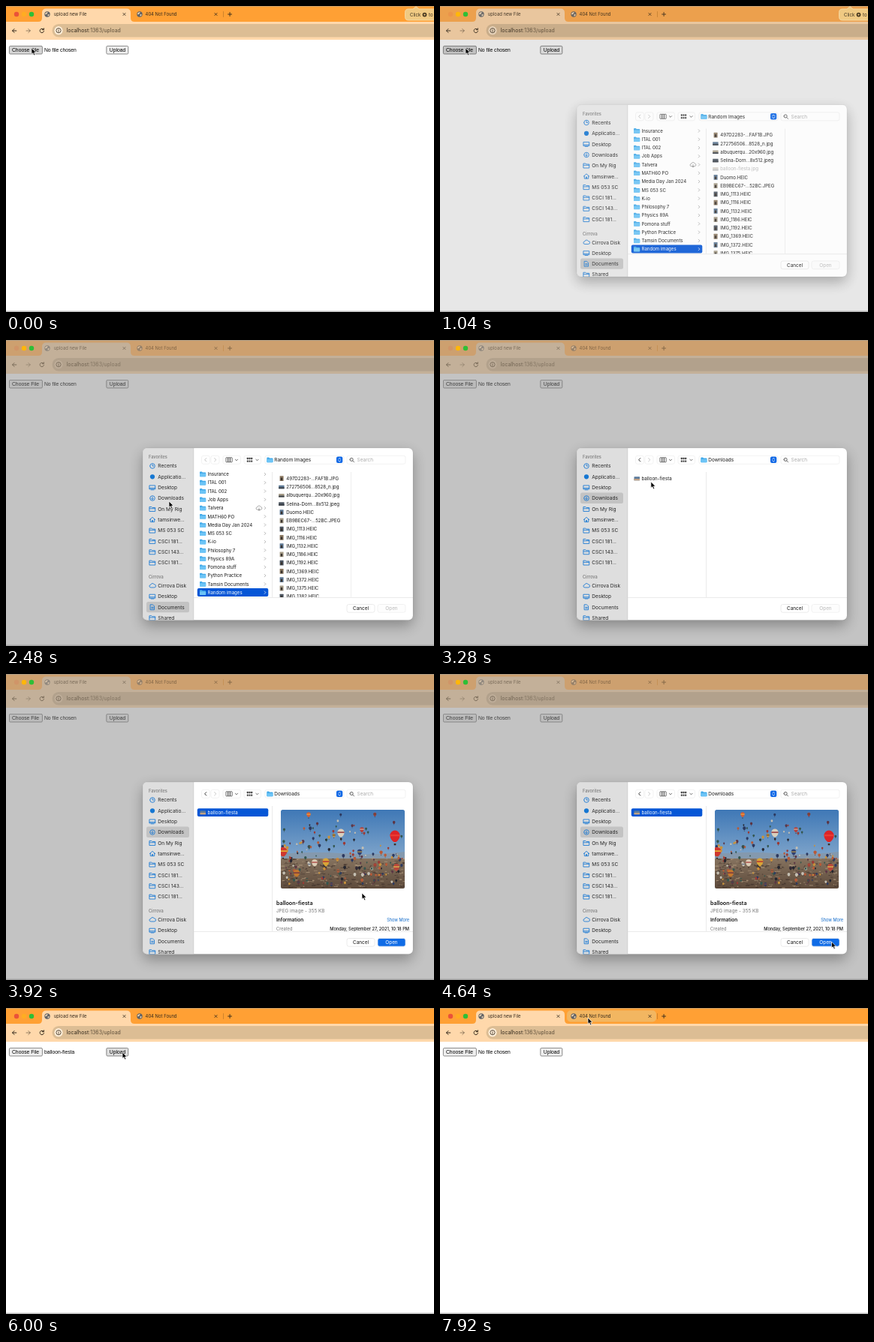
These frames come from a looping animation (570x408 px, 8000 ms). An HTML page:

```html
<!DOCTYPE html>
<html lang="en">
<head>
<meta charset="utf-8">
<title>Upload demo</title>
<style>
html,body{margin:0;width:100%;height:100%;overflow:hidden;background:#fff}
svg{display:block;width:570px;height:408px}
text{font-family:Inter,sans-serif;white-space:pre}
#page text{font-family:"Liberation Sans",Arial,sans-serif;font-size:6.75px}
</style>
</head>
<body>
<svg id="stage" viewBox="0 0 570 408" xmlns="http://www.w3.org/2000/svg"></svg>
<script>
const LOOP = 8000, STEP = 80;

// ---- markup helpers
const text = (x, y, s, size, fill = '#161616', extra = '') =>
  `<text x="${x}" y="${y}" font-size="${size}" fill="${fill}" ${extra}>${s}</text>`;
const rect = (x, y, w, h, r, fill, extra = '') =>
  `<rect x="${x}" y="${y}" width="${w}" height="${h}" rx="${r}" fill="${fill}" ${extra}/>`;
const line = (d, stroke, w = .8, extra = '') =>
  `<path d="${d}" fill="none" stroke="${stroke}" stroke-width="${w}" stroke-linecap="round" stroke-linejoin="round" ${extra}/>`;
const dot = (x, y, r, fill, extra = '') => `<circle cx="${x}" cy="${y}" r="${r}" fill="${fill}" ${extra}/>`;
const group = (id, body, extra = '') => `<g id="${id}" ${extra}>${body}</g>`;
const cross = (x, y) => line(`M${x - 1.6} ${y - 1.6}l3.2 3.2m0-3.2l-3.2 3.2`, '#33291c');
const chevron = (x, y, c = '#999') => line(`M${x - .8} ${y - 1.7}l1.7 1.7l-1.7 1.7`, c, .7);
const drop = (x, y) => line(`M${x - 1.6} ${y - .8}l1.6 1.6l1.6-1.6`, '#444', .8);

function globe(x, y) {
  return dot(x, y, 3.7, '#5f6165') +
    `<path d="M${x - 2.8} ${y - 1.2}q1.6-2 3.4-1.4q.2 1.5-1.4 1.7q-.2 1.6-1.7 1.2z M${x + .2} ${y + .3}q2-.4 2.7.3q-.6 2-2.3 2.2q.5-1.3-.4-2.5z" fill="#f3dcbc"/>`;
}

// ---- browser chrome
function chrome() {
  const ink = '#33291c';
  const lights = dot(14, 11, 3.2, '#e8493a', 'id="red"') + dot(24, 11, 3.2, '#ffab1c', 'id="yellow"') +
    dot(34, 11, 3.2, '#2fbf36');
  const tabs = globe(55, 11) + text(63.8, 13.1, 'upload new File', 5.9, ink) + cross(157.5, 11) +
    globe(178, 11) + text(185.6, 13.1, '404 Not Found', 5.9, ink) + cross(279.5, 11) +
    line('M289.5 7.5v7', '#b9772a', .7) + line('M295.6 11h5m-2.5-2.5v5', ink, .9);
  const bar = line('M13.8 33h-5.2m2.4-2.5l-2.5 2.5l2.5 2.5', ink, 1) +
    line('M27 33h5.2m-2.4-2.5l2.5 2.5l-2.5 2.5', ink, 1, 'opacity=".5"') +
    line('M50 31.3a2.7 2.7 0 1 0 .5 2.2M50.4 29.8v1.9h-2', ink, 1) +
    dot(70, 32.7, 5.6, '#fff0dc', 'id="badge"') +
    `<circle cx="70" cy="32.7" r="3.1" fill="none" stroke="${ink}" stroke-width=".8"/>` +
    line('M70 32.5v1.8M70 31v.1', ink, .8) +
    text(80.6, 35.2, 'localhost<tspan fill-opacity=".75">:1363/upload</tspan>', 6.95, ink);
  return rect(0, 0, 570, 22, 0, '#ffa034', 'id="strip"') +
    rect(169, 3.3, 119, 15.2, 5, '#f2b661', 'id="hover"') +
    `<path id="tool" d="M0 45V21H43q5 0 5-5V9q0-5.5 5.5-5.5h107q5.5 0 5.5 5.5v7q0 5 5 5H570V45z"/>` +
    rect(61.5, 24, 530, 17.5, 8.7, '#dcbd94', 'id="pill"') + lights + group('ink', tabs + bar) +
    rect(0, 0, 570, .8, 0, '#8f9aa0', 'opacity=".6"');
}

function notice() {
  return group('notice',
    `<path d="M536 4h6l4-3.2l4 3.2h30v15h-44q-4.5 0-4.5-4.5v-6q0-4.5 4.5-4.5z" fill="#f0ca83" stroke="#f8dfae" stroke-width=".8"/>` +
    text(538, 13.8, 'Click', 6.1, '#3d3220') + dot(557.5, 11.6, 2.9, '#4b3b22') + dot(557.5, 11.6, 1.1, '#f0ca83') +
    text(563, 13.8, 'to', 6.1, '#3d3220'));
}

function page() {
  const button = (id, x, w, label, tx) =>
    rect(x, 53.4, w, 10.6, 1.4, '#efefef', `id="${id}" stroke="#6f6f6f" stroke-width=".8"`) +
    `<text x="${tx}" y="61">${label}</text>`;
  return group('page', button('choose', 4.4, 44, 'Choose File', 8) +
    '<text id="picked" x="51" y="61"></text>' + button('upload', 133.8, 29, 'Upload', 137.8));
}

// ---- file dialog
const BLUE = '#1677d2', PICK = '#0556d6';
const folder = (x, y) =>
  `<path d="M${x} ${y - 2.6}q0-.8.8-.8h2l1 1h3.6q.8 0 .8.8v4q0 .8-.8.8h-6.6q-.8 0-.8-.8z" fill="#45abea"/>` +
  rect(x, y - 1.1, 8.2, 4.4, .7, '#6cc4f6');
const outline = (x, y, d) => line(`M${x} ${y}${d}`, BLUE, .85);
const icons = {
  clock: (x, y) => outline(x - 3.3, y, 'a3.3 3.3 0 1 0 6.6 0a3.3 3.3 0 1 0-6.6 0m3.3-2v2h1.7'),
  disc: (x, y) => dot(x, y, 3.1, BLUE),
  screen: (x, y) => outline(x - 3.7, y - 2.7, 'h7.4v5h-7.4zm0 3.5h7.4m-5.5 2.3h3.6'),
  down: (x, y) => outline(x - 3.3, y, 'a3.3 3.3 0 1 0 6.6 0a3.3 3.3 0 1 0-6.6 0m3.3-1.7v3.3m-1.3-1.2l1.3 1.3l1.3-1.3'),
  home: (x, y) => outline(x - 3.7, y, 'l3.7-3.3l3.7 3.3m-6.4-.6v3.6h5.4v-3.6') + rect(x - .8, y + .4, 1.6, 2.6, 0, BLUE),
  cloud: (x, y) => outline(x - 2.3, y + 2.4, 'a1.7 1.7 0 0 1 0-3.5a2.5 2.5 0 0 1 4.7-.5a2 2 0 0 1 .3 4z'),
  doc: (x, y) => outline(x - 2.5, y - 3.4, 'h3l2 2v4.9h-5zm1.3 3.4h2.4m-2.4 1.5h2.4'),
  folder: (x, y) => outline(x - 3.7, y - 2.8, 'h2.6l1 1h3.8v5h-7.4zm0 2.3h7.4')
};

function sidebar() {
  const fav = [['clock', 'Recents'], ['disc', 'Applicatio...'], ['screen', 'Desktop'], ['down', 'Downloads'],
    ['folder', 'On My Rig'], ['home', 'tamsinwe...'], ['folder', 'MS 053 SC'], ['folder', 'CSCI 181...'],
    ['folder', 'CSCI 143...'], ['folder', 'CSCI 181...']];
  const cloud = [['cloud', 'Cirrova Disk'], ['screen', 'Desktop'], ['doc', 'Documents'], ['folder', 'Shared']];
  const rows = (list, top) => list.map(([icon, name], i) => {
    const y = top + i * 14.32;
    return icons[icon](195, y) + text(202.3, y + 2.4, name, 6.6, '#262626');
  }).join('');
  const head = (y, s) => text(190, y, s, 5.6, '#858585', 'font-weight="600"');
  return rect(182, 144, 68, 230, 0, '#dedede', 'id="side"') + rect(187, 0, 57, 14.3, 2.5, '#c3c3c3', 'id="place"') +
    head(158.2, 'Favorites') + rows(fav, 168) + head(318.2, 'Cirrova') + rows(cloud, 327.6) +
    rect(249.6, 144, .6, 230, 0, '#c9c9c9');
}

function header() {
  const box = (x, w) => rect(x, 154.3, w, 11, 2.5, '#fff', 'stroke="#ececec" stroke-width=".7"');
  let cols = '', tiles = '';
  for (let i = 0; i < 3; i++) cols += rect(293 + i * 2.7, 156.8, 2.7, 6, .4, 'none', 'stroke="#444" stroke-width=".8"');
  for (let i = 0; i < 6; i++) tiles += rect(320.8 + i % 3 * 2.7, 156.8 + (i > 2 ? 3.6 : 0), 2, 2.4, .4, '#444');
  return box(260.5, 11) + box(273, 11) + box(289, 23.5) + box(317, 22.5) + box(345, 105) + box(454, 78) +
    line('M266.8 157.6l-2.2 2.2l2.2 2.2', '#222', .9, 'id="back"') +
    line('M277.6 157.6l2.2 2.2l-2.2 2.2', '#bbb', .8) +
    cols + drop(307, 160) + tiles + drop(334.5, 160) + folder(347.3, 160) +
    text(357.3, 162.3, '', 6.45, '#161616', 'id="where"') +
    rect(440, 155.6, 8.3, 8.5, 2, '#1a6fe8', 'id="stepper"') +
    line('M442.7 159l1.5-1.5l1.5 1.5m-3 1.7l1.5 1.5l1.5-1.5', '#fff', .8, 'id="arrows"') +
    line('M458 159.4a2.1 2.1 0 1 0 4.2 0a2.1 2.1 0 1 0-4.2 0m3.7 1.6l1.9 1.9', '#444', .8) +
    text(467.5, 162.3, 'Search', 6.5, '#aaa');
}

const FOLDERS = ['Insurance', 'ITAL 001', 'ITAL 002', 'Job Apps', 'Talvera', 'MATH60 PO', 'Media Day Jan 2024', 'MS 053 SC',
  'K-io', 'Philosophy 7', 'Physics 89A', 'Pomona stuff', 'Python Practice', 'Tamsin Documents', 'Random images'];
const FILES = ['497D2283-...FAF1B.JPG', '272756506...8528_n.jpg', 'albuquerqu...20x960.jpg', 'Selina-Dorn...8x512.jpeg',
  'balloon-fiesta.jpg', 'Duomo.HEIC', 'EB9BEC67-...52BC.JPEG', ...[1113, 1116, 1132, 1186, 1192, 1369, 1372, 1375, 1382].map(n => `IMG_${n}.HEIC`)];
const ROW = 11.26;

function thumb(y, i) {
  const wide = i > 0 && i < 5, c = ['#8d7a62', '#5d7894', '#a49a86', '#4c5560'][i % 4];
  return wide ? rect(363.2, y - 2.2, 7.4, 4.6, .3, c) + rect(363.2, y + .4, 7.4, 2, 0, '#3b4148')
    : rect(364.6, y - 3.4, 5, 6.8, .3, c) + rect(365.8, y - 1, 2.4, 3.6, 0, '#39332e');
}

function browse() {
  const left = FOLDERS.map((name, i) => {
    const y = 179 + i * ROW, on = i === 14;
    return (on ? rect(254.8, y - 5.6, 94.5, 10.9, 2, PICK) : '') + folder(258, y) +
      text(268.5, y + 2.2, name, 6.1, on ? '#fff' : '#161616') + chevron(345, y, on ? '#fff' : '#999') +
      (i === 4 ? `<g opacity=".6" transform="translate(337 ${y})">${line('M-2.3 2.2a1.6 1.6 0 0 1 0-3.3a2.4 2.4 0 0 1 4.6-.4a1.9 1.9 0 0 1 .2 3.7zM0-.2v3.4m-1-1l1 1l1-1', '#444', .7)}</g>` : '');
  }).join('');
  const right = FILES.map((name, i) => {
    const y = 184.6 + i * ROW;
    const body = thumb(y, i) + text(373.3, y + 2.2, name, 6.12);
    return i === 4 ? group('extra', body, 'opacity=".3"') : i > 4 ? `<g class="tail">${body}</g>` : body;
  }).join('');
  return group('browse', left + right + rect(459.3, 176, .6, 167, 0, '#e2e2e2'));
}

function balloon(x, y, r, c, band) {
  return `<path d="M${x - r} ${y}a${r} ${r} 0 0 1 ${2 * r} 0q0 ${r * .8}-${r * .75} ${r * 1.4}h-${r * .5}q-${r * .75}-${r * .6}-${r * .75}-${r * 1.4}z" fill="${c}"/>` +
    (r > 2 ? rect(x - r, y - r * .15, 2 * r, r * .35, 0, band) : '') +
    rect(x - r * .2, y + r * 1.7, r * .4, r * .35, 0, '#3d2c22');
}

function photo() {
  let seed = 41;
  const rnd = () => (seed = seed * 16807 % 2147483647) / 2147483647;
  const hues = ['#9c3a35', '#c9923b', '#2c3960', '#c4bfb2', '#5b3545', '#b85a38', '#33564e', '#25262f'];
  const pick = () => hues[Math.floor(rnd() * hues.length)];
  let s = rect(366, 181, 165, 105, 0, 'url(#sky)') +
    `<path d="M366 240q40-4 80-1t85-2v14H366z" fill="#8499ae"/>` + rect(366, 246, 165, 40, 0, 'url(#land)');
  for (let i = 0; i < 260; i++)
    s += rect(366 + rnd() * 163, 245 + rnd() * 40, 1 + rnd() * 5, .5 + rnd(), 0, rnd() < .6 ? '#43362e' : '#b8a083', 'opacity=".7"');
  for (let i = 0; i < 170; i++) {
    const y = 184 + Math.pow(rnd(), .55) * 96, r = .8 + rnd() * 1.3;
    s += balloon(368 + rnd() * 161, y, r, pick(), pick());
  }
  [[518, 215, 6.5, '#dc2428', '#ec3c34'], [446, 211, 4.6, '#d9cfbd', '#9b4043'], [426, 250, 4.4, '#d9a437', '#b63a34'],
    [369, 236, 5.2, '#cf382f', '#e5ac37'], [520, 257, 4, '#b9483a', '#dab551'], [411, 251, 3.8, '#dccdb6', '#a94440'],
    [387, 265, 4, '#c4782f', '#743541'], [471, 237, 3.2, '#303f70', '#c2a04c'], [403, 187, 2.7, '#d65d32', '#e5bd4c'],
    [474, 207, 2.8, '#b4403b', '#d4cfc2']].forEach(b => s += balloon(...b));
  return `<g clip-path="url(#pic)">${s}</g>`;
}

function preview() {
  return group('preview', photo() +
    text(360, 307.6, 'balloon-fiesta', 7.2, '#161616', 'font-weight="600"') +
    text(360, 318, 'JPEG image - 355 KB', 6.35, '#777') +
    text(360, 330.2, 'Information', 6.5, '#161616', 'font-weight="600"') +
    text(537, 330.2, 'Show More', 5.55, '#0a66c8', 'text-anchor="end"') +
    text(360, 341.6, 'Created', 5.7, '#777') +
    text(537, 341.6, 'Monday, September 27, 2021, 10:18 PM', 5.7, '#161616', 'text-anchor="end" font-weight="500"'));
}

function downloads() {
  return group('downloads', rect(254.8, 179.2, 94.5, 10.9, 2, PICK, 'id="row"') +
    rect(258.5, 182.3, 7.5, 5, .4, '#5c7b9c') + rect(258.5, 185, 7.5, 2.3, 0, '#c1a184') +
    text(268.5, 187.1, 'balloon-fiesta', 6.15, '#161616', 'id="rowName"') + preview());
}

function dialog() {
  const body = rect(182, 144, 360, 230, 0, '#fff') + sidebar() + header() +
    `<g clip-path="url(#list)">${browse()}${downloads()}${rect(354.4, 176, .6, 167, 0, '#dedede')}</g>` +
    rect(250, 343, 292, .6, 0, '#dedede') +
    rect(454, 352.5, 37, 10.7, 2.6, '#fff', 'stroke="#e2e2e2" stroke-width=".7"') +
    text(472.5, 360, 'Cancel', 6.4, '#161616', 'text-anchor="middle"') +
    rect(495, 352.5, 37, 10.7, 2.6, '#fdfdfd', 'id="open" stroke="#ececec" stroke-width=".7"') +
    text(513.5, 360, 'Open', 6.4, '#bbb', 'id="openName" text-anchor="middle"');
  return group('sheet', rect(182, 151, 360, 230, 8, '#000', 'opacity=".3" filter="url(#blur)"') +
    `<g clip-path="url(#frame)">${body}</g>` +
    rect(182, 144, 360, 229.5, 6, 'none', 'stroke="#000" stroke-opacity=".12" stroke-width=".6"'));
}

const clip = (id, x, y, w, h, r) => `<clipPath id="${id}">${rect(x, y, w, h, r, '#000')}</clipPath>`;
const fade = (id, a, b) => `<linearGradient id="${id}" x2="0" y2="1"><stop stop-color="${a}"/><stop offset="1" stop-color="${b}"/></linearGradient>`;
const stage = document.getElementById('stage');
stage.innerHTML = `<defs>${clip('frame', 182, 144, 360, 229.5, 6)}${clip('list', 250, 172, 292, 171, 0)}${clip('pic', 366, 181, 165, 105, 2.5)}` +
  fade('sky', '#3f78b6', '#a9c2d8') + fade('land', '#86735f', '#5d4a3b') +
  `<filter id="blur" x="-15%" y="-15%" width="130%" height="135%"><feGaussianBlur stdDeviation="9"/></filter></defs>` +
  rect(0, 0, 570, 408, 0, '#fff') + page() + rect(0, 45, 570, 363, 0, '#000', 'id="shade"') + chrome() + notice() +
  rect(0, 406.7, 570, .9, 0, '#8d8d8d') + dialog() +
  `<path id="cursor" d="M0 0v8.3l1.9-1.7l1.4 3.1l1.5-.7l-1.4-2.9h2.6z" fill="#000" stroke="#fff" stroke-width=".7"/>`;

// ---- timeline
const el = {};
stage.querySelectorAll('[id]').forEach(n => el[n.id] = n);
const tails = stage.querySelectorAll('.tail');
const set = (id, attrs) => { for (const k in attrs) el[id].setAttribute(k, attrs[k]); };
const show = (id, on) => set(id, { display: on ? 'inline' : 'none' });

const PATH = [[0, 34, 56], [1360, 34, 56], [2080, 216, 217], [2400, 217, 215], [2880, 217, 214], [3360, 286, 187], [3520, 287, 186],
  [3920, 474, 292], [4320, 517, 357], [4720, 522, 357], [4960, 522, 357], [5280, 300, 174], [5440, 300, 174], [5840, 157, 60],
  [6000, 155, 59], [7120, 155, 59], [7680, 189, 21], [7840, 196, 14], [7920, 197, 13], [8000, 197, 13]];
// sheet amount: 0 hidden, 1 fully down
const SHEET = [[0, 0], [1040, .4], [1200, .8], [1360, 1], [4880, .8], [4960, .4], [5040, .2], [5120, 0]];
// colours for sheet amounts 0, .4 and 1
const TINT = {
  strip: [[255, 160, 52], [236, 160, 77], [205, 160, 111]],
  tool: [[255, 216, 171], [233, 198, 158], [195, 176, 153]],
  pill: [[220, 189, 148], [201, 173, 138], [178, 161, 140]],
  badge: [[255, 238, 216], [233, 214, 190], [200, 184, 164]]
};
const mix = (a, b, k) => a + (b - a) * k;

function cursorAt(t) {
  const i = PATH.findIndex(p => p[0] > t), a = PATH[i - 1], b = PATH[i];
  let k = (t - a[0]) / (b[0] - a[0]);
  k = k * k * (3 - 2 * k);
  return [mix(a[1], b[1], k), mix(a[2], b[2], k)];
}

function tint(stops, p) {
  const [a, b, k] = p < .4 ? [stops[0], stops[1], p / .4] : [stops[1], stops[2], (p - .4) / .6];
  return `rgb(${a.map((v, i) => Math.round(mix(v, b[i], k)))})`;
}

function render(ms) {
  const t = Math.floor(ms % LOOP / STEP) * STEP;
  const p = SHEET.filter(s => s[0] <= t).pop()[1];
  const late = Math.max(0, (p - .4) / .6);
  const [x, y] = cursorAt(t);
  const closing = t >= 4880, down = t >= 2720, chosen = t >= 3440, ready = t >= 3600;
  const over = (l, r) => x >= l && x <= r && y >= 53 && y <= 64;

  for (const id in TINT) set(id, { fill: tint(TINT[id], p) });
  set('ink', { opacity: mix(1 - Math.min(p, .4) * .25, .5, late) });
  set('page', { opacity: mix(1, .68, late) });
  set('shade', { opacity: p * .235 });
  set('red', { opacity: p ? .12 : .9 });
  set('yellow', { fill: p ? '#ffb60a' : '#ffac22' });
  show('hover', t >= 7680);
  show('notice', t < 1680);
  set('notice', { transform: `translate(${Math.max(0, t - 1280) / 8} 0)` });
  set('choose', { fill: over(4, 49) ? '#d6d6d6' : '#efefef' });
  set('upload', { fill: over(134, 163) ? '#dedede' : '#efefef' });
  el.picked.textContent = t >= 5120 && t < 6480 ? 'balloon-fiesta' : 'No file chosen';

  show('sheet', p > 0);
  set('sheet', { transform: `translate(0 ${(p - 1) * 20.8})`, opacity: closing ? Math.min(1, p * 1.25) : Math.min(1, .72 + p * .4) });
  set('place', { y: down ? 203.6 : 349 });
  set('side', { fill: p < 1 ? '#e6e6e6' : '#dedede' });
  el.where.textContent = down ? 'Downloads' : 'Random Images';
  set('back', { stroke: down ? '#222' : '#bbb' });
  set('stepper', { fill: closing ? '#fff' : '#0f68e6' });
  set('arrows', { stroke: closing ? '#444' : '#fff' });
  show('browse', !down);
  show('downloads', down);
  show('extra', t < 1920);
  tails.forEach(n => n.setAttribute('transform', `translate(0 ${t < 1920 ? 0 : -ROW})`));
  show('row', chosen);
  set('row', { fill: closing ? '#d4d4d4' : PICK });
  set('rowName', { fill: chosen && !closing ? '#fff' : '#161616' });
  show('preview', ready);
  set('open', { fill: closing ? '#fff' : ready ? '#0f6be6' : '#fdfdfd' });
  set('openName', { fill: closing ? '#161616' : ready ? '#fff' : '#bbb' });
  set('cursor', { transform: `translate(${x} ${y})` });
}

const start = performance.now();
function tick() {
  render(performance.now() - start);
  requestAnimationFrame(tick);
}
tick();
</script>
</body>
</html>
```
